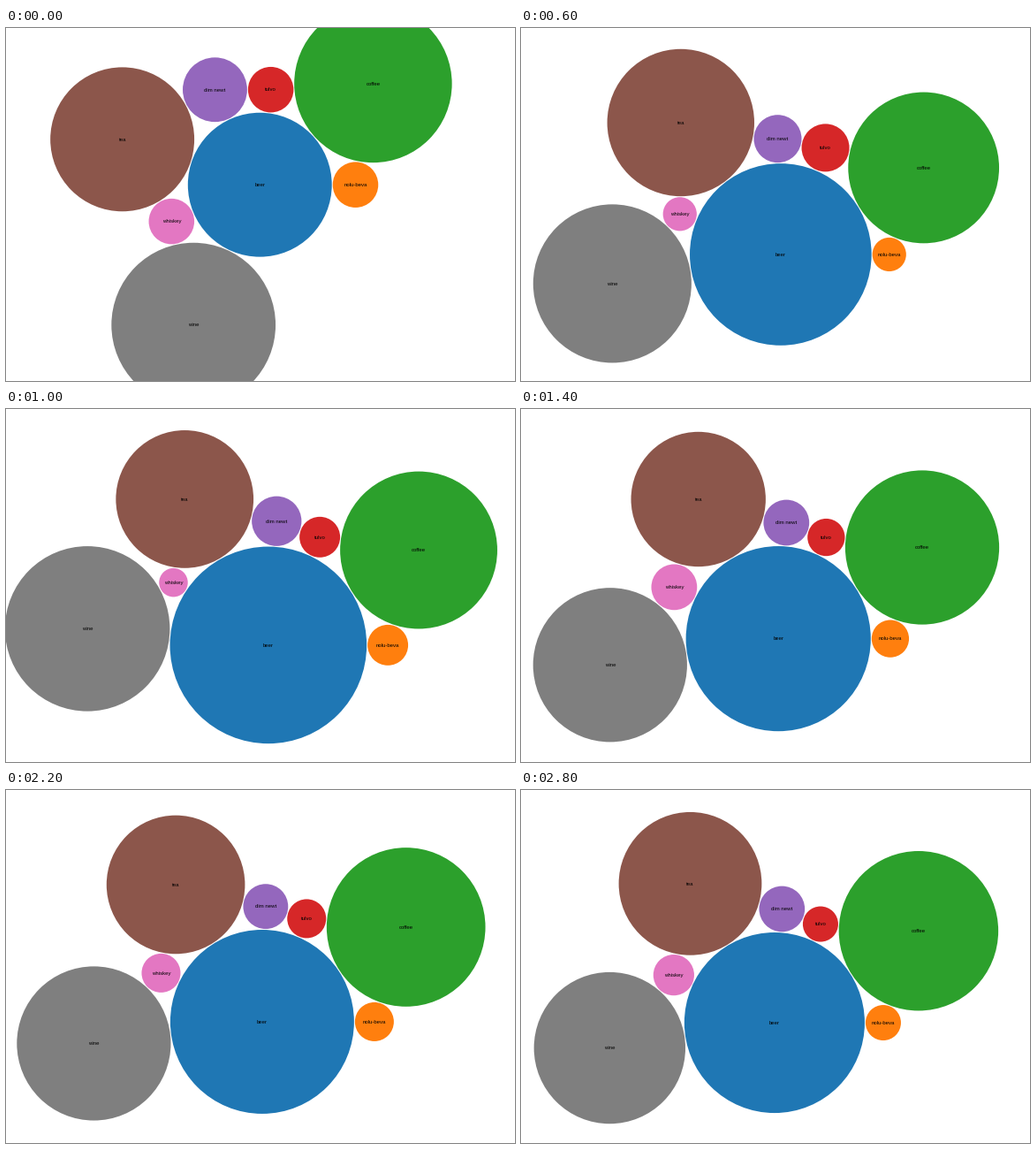
Recreate the animation shown at these times as a matplotlib script. Size 576 by 399 pixels, loop 3 s.

```python
import math

import matplotlib.pyplot as plt
import numpy as np
from matplotlib.animation import FuncAnimation
from matplotlib.patches import Circle

W, H, DPI = 576, 399, 96
CENTER = (277.4, 201.1)
REACH = 284.5       # radius of the disc that encloses all bubbles
GAP = 1.0           # space between touching bubbles
FONT_PX = 6

LABELS = ["beer", "nolu-beva", "coffee", "tulvo",
          "dim newt", "tea", "whiskey", "wine"]

# Running vote totals, one row per poll, and how many ticks each row stays.
VOTES = [
    [10, 1, 12, 1, 2, 10, 1, 13],
    [21, 1, 17, 1, 2, 15, 1, 17],
    [29, 1, 20, 2, 2, 19, 1, 22],
    [38, 2, 25, 2, 2, 21, 1, 27],
    [47, 2, 30, 2, 3, 23, 1, 33],
    [49, 2, 34, 2, 3, 26, 3, 34],
    [55, 3, 40, 3, 3, 31, 3, 39],
    [61, 3, 46, 3, 4, 36, 3, 45],
    [67, 3, 50, 3, 4, 38, 3, 47],
    [73, 3, 56, 3, 4, 43, 4, 50],
    [78, 3, 61, 3, 5, 49, 4, 55],
]
TICKS = [1, 2, 1, 1, 2, 1, 1, 2, 1, 2, 1]
TICK_MS = 200


def ring(r, gap):
    """Place every bubble against the first one and its predecessor."""
    pts = [(0.0, 0.0)]
    angle = 0.0
    for i in range(1, len(r)):
        b = r[0] + r[i] + gap
        if i > 1:
            a = r[0] + r[i - 1] + gap
            c = r[i - 1] + r[i] + gap
            angle += math.acos((a * a + b * b - c * c) / (2 * a * b))
        pts.append((b * math.cos(angle), -b * math.sin(angle)))
    return np.array(pts)


def pack(votes):
    """Return centres and radii in pixels, scaled to fill the stage."""
    r = np.sqrt(votes)
    scale = 20.0
    for _ in range(5):
        pts = ring(r, GAP / scale)
        low = (pts - r[:, None]).min(axis=0)
        high = (pts + r[:, None]).max(axis=0)
        pts = pts - (low + high) / 2
        scale = REACH / (np.hypot(*pts.T) + r).max()
    return pts * scale + CENTER, r * scale


layouts = [pack(row) for row in VOTES]
schedule = np.repeat(np.arange(len(VOTES)), TICKS)

plt.rcParams["font.family"] = "Liberation Sans"
fig = plt.figure(figsize=(W / DPI, H / DPI), dpi=DPI, facecolor="white")
ax = fig.add_axes([0, 0, 1, 1])
ax.set_xlim(0, W)
ax.set_ylim(H, 0)
ax.axis("off")

bubbles = [ax.add_patch(Circle((0, 0), 1, facecolor=f"C{i}", linewidth=0))
           for i in range(len(LABELS))]
texts = [ax.text(0, 0, name, fontsize=FONT_PX * 72 / DPI, color="black",
                 ha="center", va="baseline") for name in LABELS]


def update(tick):
    pts, radii = layouts[schedule[tick]]
    for bubble, text, (x, y), r in zip(bubbles, texts, pts, radii):
        bubble.center = (x, y)
        bubble.radius = r
        text.set_position((x, y + 0.3 * FONT_PX))
    return bubbles + texts


anim = FuncAnimation(fig, update, frames=len(schedule), interval=TICK_MS,
                     repeat=True, repeat_delay=0)
plt.show()
```
